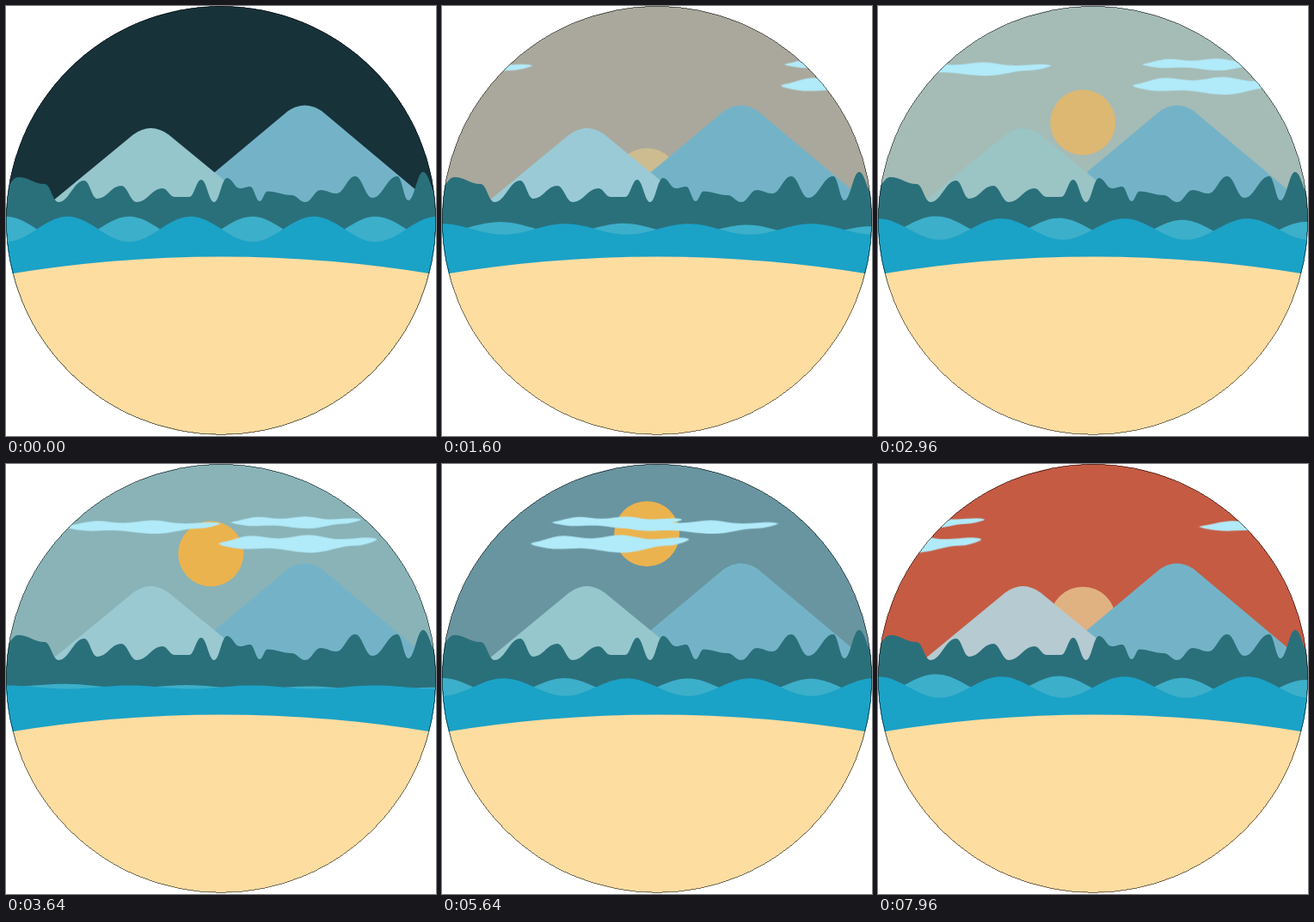
These frames come from a looping animation (500 px wide and 500 px high, 8 s). An HTML page:

```html
<!DOCTYPE html>
<html lang="en">
<head>
<meta charset="utf-8">
<title>Day at the lake</title>
<style>
  html, body { margin: 0; width: 100%; height: 100%; overflow: hidden; background: #fff; }
  svg { display: block; width: 100vw; height: 100vh; }

  #sky, #sun, #nearPeak, .cloud { animation: 8s linear infinite; }
  #sky { animation-name: sky; }
  #sun { animation-name: sun; }
  #nearPeak { animation-name: peak; }
  .cloud { fill: #b1eaf9; animation-name: drift; }
  #cloudA { --from: -189px; --to: 377px; }
  #cloudB { --from: 506px; --to: -29px; }
  #cloudC { --from: 510px; --to: -66px; }

  @keyframes sky {
    0% { fill: rgb(24, 50, 58); }
    25% { fill: rgb(206, 197, 180); }
    62.5% { fill: rgb(79, 165, 186); }
    100% { fill: rgb(199, 90, 65); }
  }
  @keyframes sun {
    0%, 29.5% { fill: rgb(206, 188, 145); }
    45.5%, 70.5% { fill: rgb(235, 179, 78); }
    84% { fill: rgb(201, 175, 125); }
    100% { fill: rgb(225, 178, 130); }
  }
  @keyframes peak {
    0% { fill: rgb(149, 198, 204); }
    20% { fill: rgb(154, 202, 214); }
    29.5% { fill: rgb(155, 191, 187); }
    45.5% { fill: rgb(155, 201, 209); }
    70.5% { fill: rgb(150, 199, 205); }
    84% { fill: rgb(173, 202, 212); }
    100% { fill: rgb(182, 202, 209); }
  }
  @keyframes drift {
    from { transform: translateX(var(--from)); }
    to { transform: translateX(var(--to)); }
  }
</style>
</head>
<body>
<svg viewBox="0 0 500 500">
  <defs>
    <clipPath id="porthole"><ellipse cx="250" cy="249.3" rx="250" ry="249.3"/></clipPath>
    <path id="puff"/>
  </defs>
  <g clip-path="url(#porthole)">
    <rect id="sky" width="500" height="500"/>
    <circle id="sun" cx="238.2" r="38"/>
    <g class="cloud" id="cloudA"><use href="#puff" transform="translate(0 65.2) scale(1.8 .16)"/></g>
    <g class="cloud" id="cloudB"><use href="#puff" transform="translate(0 60.8) scale(1.5 .143)"/></g>
    <g class="cloud" id="cloudC"><use href="#puff" transform="translate(0 82.3) scale(1.83 .21)"/></g>
    <path fill="#74b3c7" d="M200 229L328 122Q347.5 109 367 122L500 233.5V260H200Z"/>
    <path id="nearPeak" d="M40 238.5L148 149.5Q168.5 134.5 189 149.5L290 232.5V260H40Z"/>
    <path id="trees" fill="#2a707b"/>
    <path id="backWave" fill="#3cafca"/>
    <path id="frontWave" fill="#1ba2c7"/>
    <path fill="#fedda1" d="M0 312.2Q250 270.8 500 312.2V500H0Z"/>
  </g>
  <ellipse cx="250" cy="249.3" rx="249.7" ry="249" fill="none" stroke="#000" stroke-width=".5" shape-rendering="crispEdges"/>
</svg>
<script>
const LOOP = 8000, SUN_PERIOD = 10000, NOON = 5020, WAVE_PERIOD = 5000;
const WATER_LEVEL = 259.5, WAVE_LENGTH = 143.2, WAVE_HEIGHT = 14.7;

const byId = id => document.getElementById(id);
const setPath = (id, d) => byId(id).setAttribute('d', d);
const turn = part => Math.cos(2 * Math.PI * part);

// Closed Catmull-Rom spline
function blob(points) {
  const at = i => points[(i + points.length) % points.length];
  return points.reduce((d, b, i) => {
    const a = at(i - 1), c = at(i + 1), e = at(i + 2);
    const out = b.map((v, k) => v + (c[k] - a[k]) / 6);
    const into = c.map((v, k) => v - (e[k] - b[k]) / 6);
    return d + `C${out} ${into} ${c}`;
  }, 'M' + points[0]);
}

// Level at every crest and dip, eased in between
const ridge = points => points.slice(1).reduce((d, [x, y], i) => {
  const [px, py] = points[i], reach = (x - px) * .42;
  return d + `C${px + reach} ${py} ${x - reach} ${y} ${x} ${y}`;
}, 'M' + points[0]);

// One cloud in a 100 by 100 box, scaled for all three
setPath('puff', blob([[0, 52], [6, 33], [20, 6], [38, 20], [57, 1], [75, 24], [94, 16],
  [100, 28], [91, 56], [80, 66], [59, 100], [34, 76], [14, 78]]));

setPath('trees', ridge([[-2, 211], [14, 199], [45, 207], [61, 228], [91, 203], [106, 224],
  [134, 209], [152, 228], [182, 212], [196, 222], [213, 222], [227, 202], [242, 228],
  [257, 200], [272, 212], [284, 210], [295, 227], [304, 215.5], [332, 220], [348, 228],
  [366, 214], [384, 218], [406, 198], [426, 223], [455, 198], [468, 226], [485, 193],
  [502, 220]]) + 'V280H0Z');

function wave(height) {
  let d = 'M0 330';
  for (let x = 0; x <= 500; x += 4) d += `L${x} ${height(x).toFixed(2)}`;
  return d + 'V330Z';
}

let start;
function draw(now) {
  start ??= now;
  const t = (now - start) % LOOP;
  byId('sun').setAttribute('cy', 75 + 83 * (1 - turn((t - NOON) / SUN_PERIOD)));

  const swing = turn(t / WAVE_PERIOD);
  const swell = x => swing * WAVE_HEIGHT * turn((x - 71.6) / WAVE_LENGTH);
  // the back wave slides left and tilts as it rises on the down swing
  const rise = (1 - swing) / 2;
  setPath('frontWave', wave(x => WATER_LEVEL - swell(x)));
  setPath('backWave', wave(x => WATER_LEVEL + swell(x + 4 * rise) + rise * (x - 250) / 60));
  requestAnimationFrame(draw);
}
requestAnimationFrame(draw);
</script>
</body>
</html>
```
